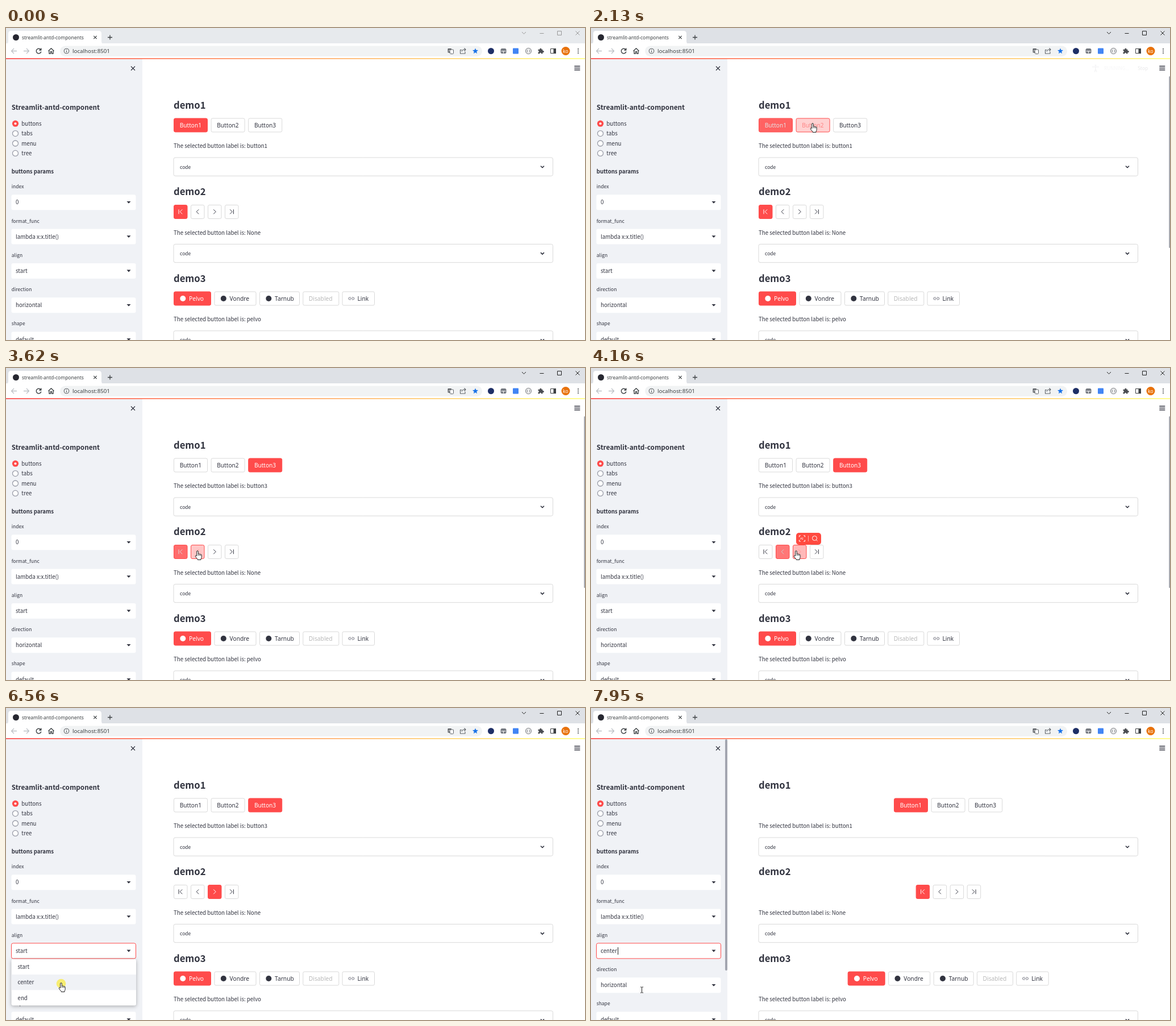
Recreate the animation shown at these times as an HTML page with a canvas. Size 1019 px wide and 549 px high, loop 8000 ms.

```html
<!DOCTYPE html>
<html lang="en">
<head>
<meta charset="utf-8">
<title>Component demo</title>
<style>
html, body { margin: 0; width: 100%; height: 100%; overflow: hidden; background: #fff; }
canvas { display: block; width: 1019px; height: 549px; }
</style>
</head>
<body>
<canvas id="stage"></canvas>
<script>
const W = 1019, H = 549, LOOP = 8000;
const canvas = document.getElementById('stage');
const c = canvas.getContext('2d');
const ratio = window.devicePixelRatio || 1;
canvas.width = W * ratio;
canvas.height = H * ratio;

const PAGE = '"Noto Sans CJK SC", "Noto Sans CJK JP", "Noto Sans CJK", sans-serif';
const UI = '"Noto Sans", "Open Sans", sans-serif';
const RED = '#ff4b4b', INK = '#31333f', LINE = '#d9d9d9', GREY = '#5f6368';

// Timing helpers
const clamp = v => Math.max(0, Math.min(1, v));
const smooth = v => (v = clamp(v), v * v * (3 - 2 * v));
const ramp = (t, from, to) => clamp((t - from) / (to - from));
const within = (t, spans) => spans.some(([a, b]) => t >= a && t < b);
const latest = (t, steps) => steps.filter(s => s[0] <= t).pop();
const mix = (a, b, p) => {
  const part = (hex, i) => parseInt(hex.substr(1 + 2 * i, 2), 16);
  return `rgb(${[0, 1, 2].map(i => Math.round(part(a, i) + (part(b, i) - part(a, i)) * p))})`;
};

// Drawing helpers
function rect(x, y, w, h, r, fill, stroke) {
  c.beginPath();
  c.roundRect(x, y, w, h, r);
  if (fill) { c.fillStyle = fill; c.fill(); }
  if (stroke) { c.strokeStyle = stroke; c.lineWidth = 1; c.stroke(); }
}
function circle(x, y, r, fill, stroke, width = 1) {
  c.beginPath();
  c.arc(x, y, r, 0, 7);
  if (fill) { c.fillStyle = fill; c.fill(); }
  if (stroke) { c.strokeStyle = stroke; c.lineWidth = width; c.stroke(); }
}
function text(s, x, middle, size = 9.72, color = INK, font = PAGE, weight = 400) {
  c.font = `${weight} ${size}px ${font}`;
  c.fillStyle = color;
  c.fillText(s, x, middle + size * .38);
}
function icon(d, x, y, color, width = 1.2, fill) {
  const path = new Path2D(d);
  c.save();
  c.translate(x, y);
  c.lineJoin = 'round';
  if (fill) { c.fillStyle = fill; c.fill(path); }
  if (color) { c.strokeStyle = color; c.lineWidth = width; c.stroke(path); }
  c.restore();
}
const CROSS = 'M-3.5-3.5L3.5 3.5M3.5-3.5L-3.5 3.5';
const CHEVRON = 'M-3-1.5L0 1.5L3-1.5';
const TRIANGLE = 'M-3.5-1.8H3.5L0 2Z';
const HAND = 'M-1.3 9V1Q-1.3-.3 0-.3Q1.3-.3 1.3 1V5Q2.3 4.3 3.4 5.4Q4.6 4.8 5.4 6Q7.2 5.7 7.2 7.4V10.5Q7.2 12.5 6 14V15.5H.2V14.3Q-2.2 12.5-3.7 9.4Q-3.8 7.7-2.4 7.9Z';
const ARROW = 'M0 0V11.2L2.6 8.8L4.4 12.7L6.2 11.9L4.5 8.1H7.7Z';
const BEAM = 'M-2.5-5H-.7L0-4.4L.7-5H2.5M0-4.5V4.5M-2.5 5H-.7L0 4.4L.7 5H2.5';

// Schedule
const CLOSE = 6630, RECENTER = 6800;
const pointer = [[790, 190, 512], [1480, 388, 170], [1600, 390, 168], [2200, 390, 168], [2650, 444, 166],
  [2900, 444, 166], [3200, 375, 281], [3450, 337, 322], [3750, 337, 322], [4000, 361, 322], [4210, 361, 322],
  [4850, 134, 384], [5000, 134, 384], [5530, 108, 428], [6070, 108, 428], [6450, 97, 484], [7850, 97, 484], [7950, 89.5, 496]];
const shapes = [[0, 'arrow'], [1430, 'hand'], [2920, 'arrow'], [3350, 'hand'], [4260, 'arrow'],
  [5350, 'beam'], [6160, 'hand'], [CLOSE, 'beam']];
const presses = [[1970, 2050], [2690, 2770], [3480, 3550], [3990, 4070], [5670, 5740], [6510, 6620]];
const runs = [[2115, 3420], [3640, 3960], [4260, 4720], [6690, 7120]];
const pick1 = [[-999, 0], [2068, 1], [2778, 2], [RECENTER, 0]];
const pick2 = [[-999, 0], [3550, 1], [4080, 2], [RECENTER, 0]];
const label1 = [[0, 1], [2210, 2], [2845, 3], [RECENTER, 1]];

function pointerAt(t) {
  const i = pointer.findIndex(p => p[0] > t);
  if (i < 0) return pointer[pointer.length - 1].slice(1);
  const [t0, x0, y0] = pointer[i - 1], [t1, x1, y1] = pointer[i];
  const p = smooth((t - t0) / (t1 - t0));
  return [x0 + (x1 - x0) * p, y0 + (y1 - y0) * p];
}

// Share of the selected look for a button in a group
function selection(t, picks, index) {
  const now = latest(t, picks), before = picks[picks.indexOf(now) - 1];
  if (now[0] === RECENTER || !before) return +(now[1] === index);
  if (now[1] === index) return smooth((t - now[0]) / 190);
  if (before[1] === index) return 1 - smooth((t - now[0] - 20) / 190);
  return 0;
}

function drawBrowser(t) {
  const active = t >= 1990, ctl = active ? '#222' : '#999';
  c.fillStyle = active ? '#dee1e6' : '#e7eaed';
  c.fillRect(0, 0, W, 28);
  c.fillStyle = '#fff';
  c.fillRect(0, 27, W, 26);
  icon('M0 28Q4 28 4 23V10Q4 5 9 5H163Q168 5 168 10V23Q168 28 172 28Z', 0, 0, null, 0, '#fff');
  circle(17.5, 16.5, 5.5, '#262730');
  text('streamlit-antd-components', 28, 16.5, 8.47, '#3c4043', UI);
  icon('M-2.7-2.7L2.7 2.7M2.7-2.7L-2.7 2.7', 157, 16.5, '#3c4043', 1.2);
  icon('M-4 0H4M0-4V4', 183, 16.5, '#3c4043', 1.3);
  icon('M-3.5-1.5L0 2L3.5-1.5', 911.5, 8.5, ctl, 1);
  icon('M-3.5 .5H3.5', 943, 9, ctl, 1);
  icon('M-3.5-3.5H3.5V3.5H-3.5Z', 974, 9, ctl, 1);
  icon(CROSS, 1006, 9, ctl, 1);

  icon('M5 0H-4.5M0-4.5L-4.5 0L0 4.5', 14, 40.5, '#bdc1c6', 1.3);
  icon('M-5 0H4.5M0-4.5L4.5 0L0 4.5', 36, 40.5, '#bdc1c6', 1.3);
  icon('M3.6-2.4A4.3 4.3 0 1 0 4.3 1M4.3-5V-1.5H.8', 57.5, 40.5, '#3c4043', 1.4);
  icon('M-5 0L0-4.8L5 0M-3.6-1V4.5H-1V1H1V4.5H3.6V-1', 79.5, 40.5, '#3c4043', 1.3);
  rect(95, 31.5, 743, 18.5, 9.2, '#f1f3f4');
  circle(106.5, 40.5, 4.3, null, GREY, 1.1);
  icon('M0-.5V2.5M0-2.5V-1.5', 106.5, 40.5, GREY);
  text('localhost:8501', 117, 40.5, 9.72, '#3c4043', UI);

  rect(777.5, 36, 6.5, 7.5, 1, GREY);
  rect(781.5, 38, 6, 7.5, 1, '#fff', GREY);
  text('A', 778.4, 39.6, 5.5, '#fff', UI);
  icon('M-2-2H-4.5V4.5H4V1M-2 1Q-1-2.5 2-2.5H5M2.5-5L5-2.5L2.5 0', 804, 40.5, GREY, 1.1);
  icon('M0-5L1.4-1.7L5-1.5L2.2.9L3.1 4.4L0 2.5L-3.1 4.4L-2.2.9L-5-1.5L-1.4-1.7Z', 826, 40.5, null, 0, '#1a73e8');
  circle(853.5, 40.5, 5.5, '#1e2f66');
  rect(870.5, 36, 10, 9, 2.5, '#777b82');
  icon('M-3.8 .3H3.8M0 .3V4', 875.5, 40.5, '#fff', 1);
  rect(892, 35.5, 10, 10, 1, '#4285f4');
  circle(919.5, 40.5, 5, null, GREY, 1);
  icon('M-1-2.3Q-2.5-2-2.5 0Q-2.5 2-1 2.3M1-2.3Q2.5-2 2.5 0Q2.5 2 1 2.3', 919.5, 40.5, GREY, 1);
  icon('M-4.5-2.5H-1.5A1.5 1.5 0 1 1 1.3-2.5H3.5V0A1.5 1.5 0 1 1 3.5 2.5V5H1A1.4 1.4 0 1 0-1.7 5H-4.5V2.5A1.4 1.4 0 1 0-4.5-.3Z', 941, 40.3, null, 0, '#4a4d51');
  rect(958.5, 36.5, 9, 8, 0, '#fff', '#3c4043');
  c.fillStyle = '#3c4043';
  c.fillRect(963.5, 36, 4.5, 9);
  circle(985, 40.5, 7.5, '#e8710a');
  text('ko', 980, 40.3, 8.5, '#fff', UI);
  for (const y of [37, 40.5, 44]) circle(1007, y, 1, '#3c4043');
}

function drawSelect(label, value, middle, focused) {
  text(label, 9.7, middle - 27.8, 8.5);
  rect(9.5, middle - 13.5, 219, 27, 3, '#fff', focused ? RED : null);
  text(value, 17, middle);
  icon(TRIANGLE, 216, middle, null, 0, INK);
}

function drawSidebar(t) {
  c.fillStyle = '#f0f2f6';
  c.fillRect(0, 53, 240, H);
  icon(CROSS, 223.5, 71, INK, 1.2);
  text('Streamlit-antd-component', 9.7, 139.5, 11.75, INK, PAGE, 600);
  ['buttons', 'tabs', 'menu', 'tree'].forEach((name, i) => {
    const y = 168.2 + i * 17.4;
    if (i) circle(16.5, y, 5, '#fff', '#9a9da8', 1.3);
    else { circle(16.5, y, 5.6, RED); circle(16.5, y, 2, '#fff'); }
    text(name, 27.3, y);
  });
  text('buttons params', 9.7, 252.2, 9.6, INK, PAGE, 600);
  const centered = t >= CLOSE;
  const values = [['index', '0'], ['format_func', 'lambda x:x.title()'],
    ['align', centered ? 'center' : 'start'], ['direction', 'horizontal'], ['shape', 'default']];
  values.forEach(([label, value], i) => drawSelect(label, value, 306.8 + i * 60.3, i === 2 && t >= 5670));
  if (t >= 5670 && (centered ? (t - CLOSE) % 1020 < 510 : t < 5740)) {
    c.fillStyle = '#222';
    c.fillRect(centered ? 47 : 17, 421, 1, 13);
  }
  if (within(t, [[790, 960], [4560, 6150], [CLOSE + 60, LOOP]])) rect(236, 55, 4, 407, 2, '#a3a6b0');
}

function drawMenu(t) {
  if (t < 5690 || t >= CLOSE) return;
  c.save();
  c.globalAlpha = ramp(t, 5690, 5830);
  c.shadowColor = 'rgba(0,0,0,.3)';
  c.shadowBlur = 6;
  c.shadowOffsetY = 1.5;
  rect(9.5, 442, 219.5, 81.5, 3, '#fff');
  c.shadowColor = 'transparent';
  c.fillStyle = '#f0f2f6';
  c.fillRect(9.5, t < 6360 ? 442 : 469, 219.5, 27.3);
  ['start', 'center', 'end'].forEach((s, i) => text(s, 20.5, 455.3 + i * 27.3));
  c.restore();
}

function drawButton(x, y, w, on, hover, content) {
  const border = hover || on > .5 ? RED : mix(LINE, RED, on);
  rect(x + .5, y + .5, w - 1, 24, 2.5, mix('#ffffff', RED, on), border);
  content(mix(hover ? '#ff5a5a' : INK, '#ffffff', on));
}

function drawSection(i, caption) {
  const y = i * 152.4;
  text(`demo${i + 1}`, 295, 135.6 + y, 16.6, INK, PAGE, 600);
  text(`The selected button label is: ${caption}`, 295, 207.7 + y);
  rect(295, 228 + y, 667.5, 32.3, 3, '#fff', LINE);
  text('code', 306, 244.3 + y, 8.5);
  icon(CHEVRON, 944, 244.2 + y, INK, 1.6);
}

function drawMain(t) {
  const centered = t >= RECENTER;
  drawSection(0, `button${latest(t, label1)[1]}`);
  drawSection(1, 'None');
  drawSection(2, 'pelvo');

  const hover1 = within(t, [[1470, 2420]]) ? 1 : within(t, [[2500, 2960]]) ? 2 : -1;
  for (let i = 0; i < 3; i++) {
    const x = 295 + i * 65.6 + (centered ? 238 : 0);
    drawButton(x, 158.5, 60, selection(t, pick1, i), hover1 === i,
      color => text(`Button${i + 1}`, x + 10.7, 171, 10.1, color, UI));
  }

  const glyphs = ['M-3.2-4V4M3-4L-1 0L3 4', 'M2-4L-2 0L2 4', 'M-2-4L2 0L-2 4', 'M3.2-4V4M-3-4L1 0L-3 4'];
  const hover2 = within(t, [[3380, 3860]]) ? 1 : within(t, [[3920, 4260]]) ? 2 : -1;
  glyphs.forEach((d, i) => {
    const x = 295 + i * 30 + (centered ? 276.7 : 0);
    drawButton(x, 311, 24.5, selection(t, pick2, i), hover2 === i,
      color => icon(d, x + 12.2, 323.3, color, 1));
  });

  const links = [['Pelvo', 295, 66], ['Vondre', 366.5, 74], ['Tarnub', 446, 71], ['Disabled', 522.3, 64], ['Link', 591.5, 57.5]];
  links.forEach(([name, left, w], i) => {
    const x = left + (centered ? 156.7 : 0);
    drawButton(x, 463.5, w, +(i === 0), false, color => {
      if (i < 3) circle(x + 16.3, 476, 5, color);
      if (i === 4) icon('M-1-2H-3A2 2 0 0 0-3 2H-1M1-2H3A2 2 0 0 1 3 2H1M-2.4 0H2.4', x + 16.3, 476, '#777983', 1);
      text(name, x + (i === 3 ? 10.5 : 27), 476, 10.25, i === 3 ? '#b8b8b8' : color, UI);
    });
  });

  icon('M-5-3.3H5M-5 0H5M-5 3.3H5', 1005.3, 70.5, INK, 1.4);
  drawRunning(t);
  if (within(t, [[1000, 4560]])) rect(1017.3, 85, 2, 302, 1, '#9da0a8');
}

function drawRunning(t) {
  const run = runs.find(([a, b]) => t >= a && t < b);
  if (!run) return;
  c.save();
  c.globalAlpha = ramp(t, run[0], run[0] + 140);
  const sprint = Math.floor(t / 240) % 2;
  circle(sprint ? 890 : 888, 65.8, 1.6, '#a3a6ae');
  icon(sprint ? 'M1.5-2.5L-1 1.5L2 3.5V7M-1 1.5L-2.5 4.5H-6M-4.5 0L-3-2.8L1.5-2.5L3 0H5'
    : 'M-6-2H6M0-2V2L-2 7M0 2L2 7', 888, 70.5, '#a3a6ae', 1.7);
  text('RUNNING...', 903, 71, 8.3, '#b2b4bb');
  text('Stop', 962, 71, 8.5);
  c.restore();
}

function drawPopup(t) {
  if (t < 3780 || t > 5200) return;
  c.save();
  c.globalAlpha = 1 - ramp(t, 4940, 5200);
  rect(361, 290, 44, 21, 5, '#ff4a40');
  icon('M-5-2.5V-5H-2.5M2.5-5H5V-2.5M5 2.5V5H2.5M-2.5 5H-5V2.5', 371.5, 300, '#fff', 1);
  text('AI', 368, 300, 6, '#fff', UI);
  icon('M0-5V5', 382.5, 300, '#ffb0aa', 1);
  circle(393.5, 299.5, 4, null, '#fff', 1);
  icon('M2.8 2.8L5 5', 393.5, 299.5, '#fff', 1);
  c.restore();
}

function drawPointer(t) {
  if (t < 790) return;
  const [x, y] = pointerAt(t), shape = latest(t, shapes)[1];
  if (within(t, presses)) circle(x, y + 1, 8.3, 'rgba(250,235,70,.75)');
  if (shape === 'beam') icon(BEAM, x, y, '#222', 1);
  else icon(shape === 'hand' ? HAND : ARROW, x, y, '#222', 1, '#fff');
  if (shape === 'hand') icon('M1.3 5V8.3M3.4 5.5V8.3M5.4 6.2V8.5', x, y, '#222', .8);
}

function draw() {
  const t = performance.now() % LOOP;
  c.setTransform(ratio, 0, 0, ratio, 0, 0);
  c.fillStyle = '#fff';
  c.fillRect(0, 0, W, H);
  drawBrowser(t);
  drawSidebar(t);
  drawMain(t);
  const glow = c.createLinearGradient(0, 0, W, 0);
  glow.addColorStop(0, RED);
  glow.addColorStop(1, '#fffd80');
  c.fillStyle = glow;
  c.fillRect(0, 53, W, 1.7);
  drawMenu(t);
  drawPopup(t);
  drawPointer(t);
  requestAnimationFrame(draw);
}
draw();
</script>
</body>
</html>
```
